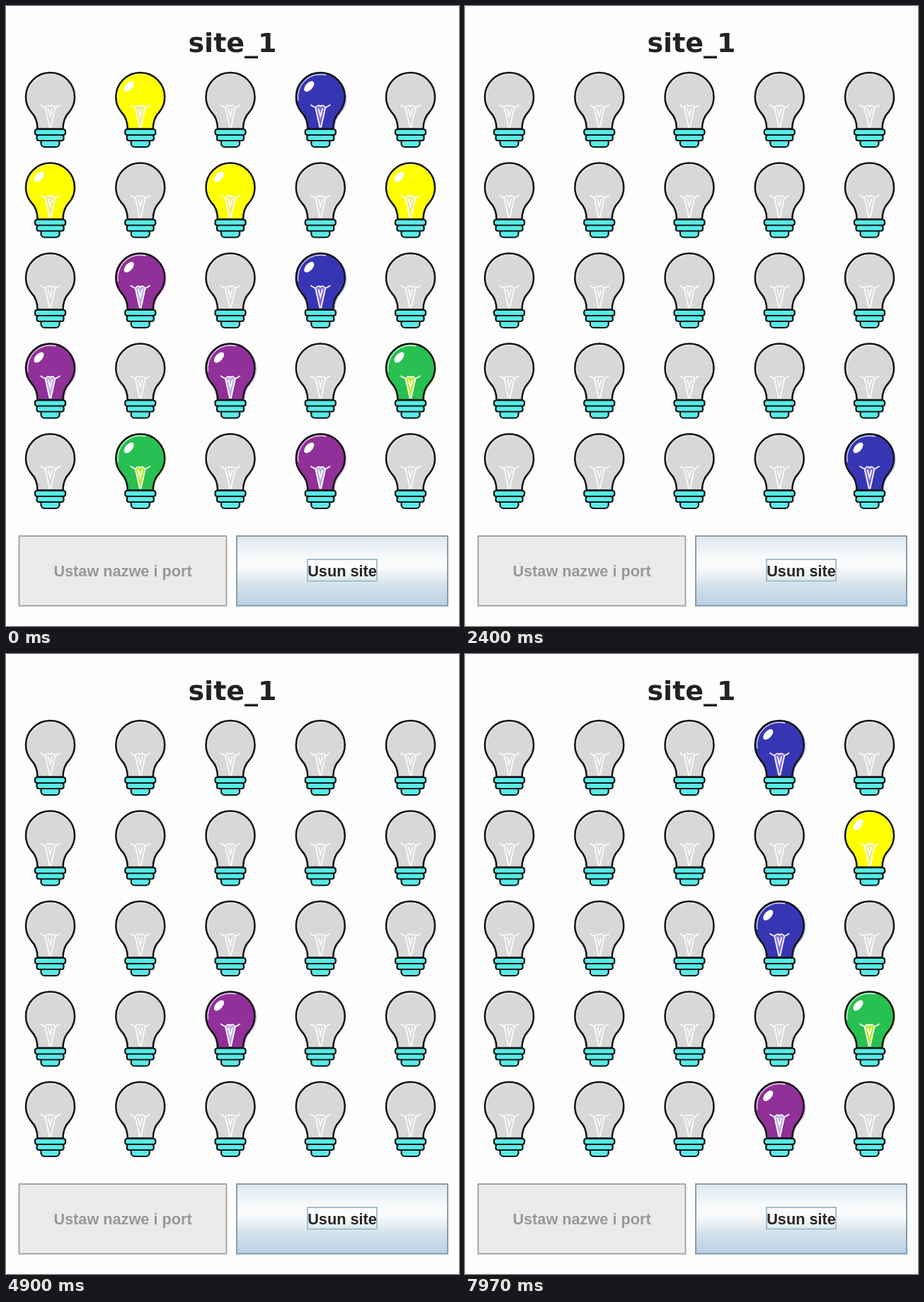
An HTML page with a canvas for the animation above (8 s loop, 640 by 875 pixels).

```html
<!DOCTYPE html>
<html lang="pl">
<head>
<meta charset="utf-8">
<title>site_1</title>
<style>
html, body { margin: 0; width: 100%; height: 100%; overflow: hidden; background: #fdfdfd; }
canvas { display: block; }
</style>
</head>
<body>
<canvas id="stage" width="640" height="875"></canvas>
<script>
const ctx = document.getElementById('stage').getContext('2d');
const LOOP = 8000, STEP = 94;
const INK = '#141414', OFF = '#d8d8d8', METAL = '#56ece8', WIRE = '#fcfcfc';

const PAINTS = {
  Y: { glass: '#ffff00', core: '#eeee70', rim: '#ffff00' },
  B: { glass: '#3636b4', core: '#8468e8', rim: '#4a4ad8' },
  P: { glass: '#903098', core: '#bcaeec', rim: '#d050d8' },
  G: { glass: '#28c050', core: '#b8ee20', rim: '#c8f030' },
  R: { glass: '#e00020', core: '#ff6878', rim: '#ff4060' }
};
const COLORS = ['YYGBB', 'YYYYY', 'RPGBR', 'PBPRG', 'BGYPP'];

const glass = new Path2D('M-18 80C-18 67-22 61-27 56C-32 50-34.5 43-34.5 35A34.5 34.5 0 0 1 34.5 35C34.5 43 32 50 27 56C22 61 18 67 18 80Z');
const innerRim = new Path2D('M-31.5 40A32 32 0 0 1 8 4');
const core = new Path2D('M-7 50Q0 44 7 50L1 77H-1Z');
const filament = new Path2D('M-14 46L-7 50L-1 77H1L7 50L14 46M-7 50Q-4 45 0 48Q4 45 7 50M-3 51L0 62L3 51');
const base = new Path2D();
base.roundRect(-21.5, 80.5, 43, 8, 3);
base.roundRect(-19, 88.5, 38, 8, 3);
base.roundRect(-13, 96.5, 26, 9, [1, 1, 5, 5]);

function fill(path, color) {
  ctx.fillStyle = color;
  ctx.fill(path);
}

function stroke(path, color, width) {
  ctx.strokeStyle = color;
  ctx.lineWidth = width;
  ctx.stroke(path);
}

function bulb(row, col, colorKey) {
  const paint = PAINTS[colorKey];
  ctx.save();
  ctx.translate(62.5 + col * 127.25, 93.5 + row * 127.5);
  if (paint) {
    ctx.save();
    ctx.translate(2, 1);
    ctx.globalAlpha = 0.55;
    fill(base, METAL);
    if (colorKey !== 'Y') stroke(glass, paint.rim, 1);
    ctx.restore();
  }
  fill(glass, paint ? paint.glass : OFF);
  ctx.globalAlpha = paint && colorKey !== 'Y' ? 0.85 : 0.4;
  stroke(innerRim, WIRE, 1.3);
  ctx.globalAlpha = 1;
  if (paint) {
    fill(core, paint.core);
    ctx.beginPath();
    ctx.ellipse(-16, 20, 9, 5, -0.85, 0, 7);
    ctx.fillStyle = '#fff';
    ctx.fill();
  }
  stroke(filament, WIRE, 1.8);
  stroke(glass, INK, 2.5);
  fill(base, METAL);
  stroke(base, INK, 2.2);
  ctx.restore();
}

// Light show: checkerboard, diagonal sweeps, column scan, staggered columns.
function isLit(n, row, col) {
  if (n < 8) return (row + col + n) % 2 === 1;
  if (n < 35) return row + col === (n - 8) % 9;
  if (n < 39) return false;
  if (n < 64) return col * 5 + row === n - 39;
  const even = (127 - n) % 5;
  return col === (row % 2 ? (even + 1) % 5 : even);
}

function colorOf(n, row, col) {
  return n < 35 && row + col === 8 ? 'B' : COLORS[row][col];
}

function gradient(top, bottom, stops) {
  const g = ctx.createLinearGradient(0, top, 0, bottom);
  stops.forEach(([at, color]) => g.addColorStop(at, color));
  return g;
}

function label(text, x, y, font, color) {
  ctx.font = font;
  ctx.fillStyle = color;
  ctx.textAlign = 'center';
  ctx.fillText(text, x, y);
}

function box(x, y, w, h, border, background) {
  if (background) {
    ctx.fillStyle = background;
    ctx.fillRect(x, y, w, h);
  }
  ctx.strokeStyle = border;
  ctx.lineWidth = 1.8;
  ctx.strokeRect(x, y, w, h);
}

function draw(time) {
  const n = Math.floor((time % LOOP) / STEP);
  ctx.fillStyle = '#fdfdfd';
  ctx.fillRect(0, 0, 640, 875);
  label('site_1', 320, 65, 'bold 38px "DejaVu Sans", sans-serif', '#222222');

  for (let row = 0; row < 5; row++)
    for (let col = 0; col < 5; col++)
      bulb(row, col, isLit(n, row, col) ? colorOf(n, row, col) : '');

  const buttonFont = 'bold 21.7px "Liberation Sans", Arial, sans-serif';
  box(18.5, 748, 293, 98.5, '#a0a098', '#ebebeb');
  label('Ustaw nazwe i port', 165, 805, buttonFont, '#989898');
  box(326, 748, 298, 98.5, '#8094a4',
    gradient(748, 846, [[0, '#dde8f0'], [0.3, '#f8fafb'], [0.45, '#fbfcfc'], [0.7, '#d6e2ea'], [1, '#b8cfe2']]));
  box(426, 781, 98, 30.5, '#98b8cc');
  label('Usun site', 475, 805, buttonFont, '#262626');
}

const start = performance.now();
function tick() {
  draw(performance.now() - start);
  requestAnimationFrame(tick);
}
tick();
</script>
</body>
</html>
```
